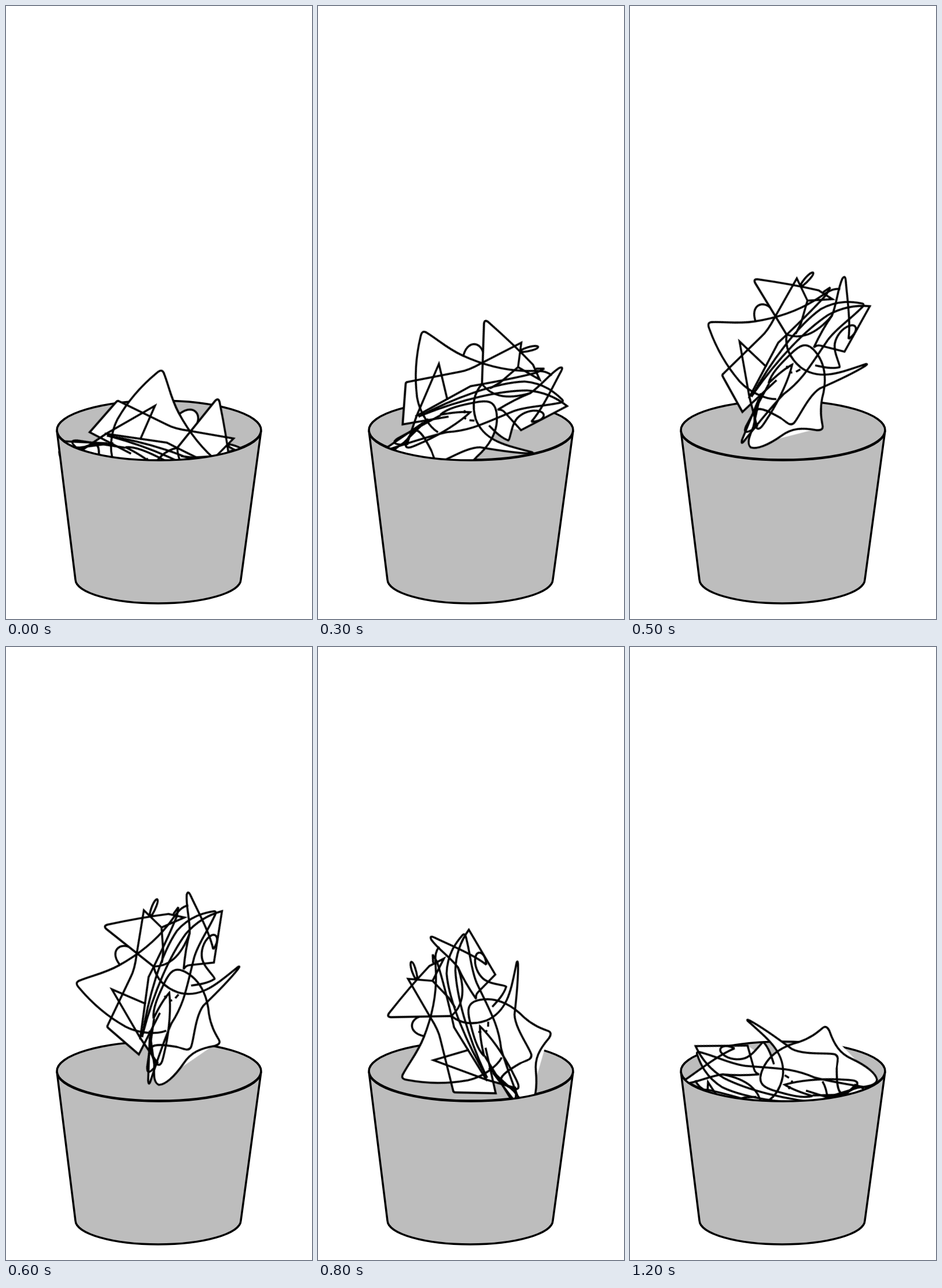
These frames come from a looping animation (529x1058 px, 1.3 s). An HTML page:

```html
<!DOCTYPE html>
<html lang="en">
<head>
<meta charset="utf-8">
<title>Paper basket</title>
<style>
  html, body { margin: 0; width: 100%; height: 100%; overflow: hidden; background: #fff; }
  svg { display: block; width: 100%; height: 100%; }
  .line { stroke: #000; stroke-width: 3.5; stroke-linejoin: miter; }
  .bin { fill: #bdbdbd; }
  #paper { fill: #fff; }
  #creases { fill: none; }
</style>
</head>
<body>
<svg viewBox="0 0 529 1058">
  <ellipse class="line bin" cx="264.5" cy="732" rx="176.5" ry="51"/>
  <g id="paper">
    <path d="M183 603L188 567L205 510L244 490L256 462L306 480L335 541L312 592L345 612L390 667L318 770L276 700L269 735L201 710L204 694Z"/>
    <g id="sheets"></g>
    <g id="creases" class="line"></g>
  </g>
  <path class="line bin" d="M88 733L120 990C121 1013 185 1031 263 1031S405 1013 406 990L441 733A176.5 51 0 0 1 88 733Z"/>
</svg>
<script>
const folds = [
  // left ear
  "M259 464C246 472 245 486 238 508C226 545 207 575 183 603C165 624 148 634 130 650C122 656 125 660 133 664C165 682 198 693 230 698C255 701 285 693 299 680",
  // upper ear running into the right horn
  "M229 516L260 486L232 490Q190 512 140 544Q133 549 141 552L240 584C250 600 268 611 295 611C335 608 352 575 377 533Q380 530 378 537C370 562 357 590 344 617C337 640 350 680 349 692C347 701 338 698 325 700C305 704 288 708 285 716C286 724 297 738 306 740C314 740 310 725 308 708C303 675 293 640 281 617Q274 635 271 668",
  // straight edges
  "M251 573L246 553L229 516L190 499L205 575Q211 600 209 615L201 706Q200 710 204 711L269 735L278 655",
  "M250 649L186 646L262 708L305 738",
  "M240 487L244 473L247 488Q246 530 238 604L262 710",
  // small loop and arc
  "M202 503C199 485 202 473 205 473C209 474 208 492 206 502Z",
  "M185 602C160 588 168 567 188 567",
  // top peaks
  "M326 520C310 495 275 465 257 447Q249 439 250 448C256 468 270 485 278 508C280 530 285 552 290 570Q291 563 297 560L335 541L317 453C300 465 282 485 272 512C260 555 255 620 263 700",
  "M264 705C250 640 244 560 256 512C268 480 290 466 304 458Q309 456 308 465C305 500 298 520 300 545C306 600 312 625 303 665Q301 700 304 772Q304 780 300 772L276 700",
  // lower right corner
  "M271 668C262 650 266 620 267 605C269 580 275 573 290 573C330 576 350 610 358 627C368 645 380 655 390 663Q396 668 387 675C365 688 352 700 347 722C340 750 330 768 320 772C310 772 306 760 300 742L272 690",
  "M272 668L290 750Q295 766 302 747L304 735",
  // curl
  "M326 520C331 500 322 492 315 498C306 508 306 525 311 537C318 555 345 562 346 567C338 578 325 585 312 592",
  "M240 584C262 575 278 555 278 508",
  "M275 625L280 627M290 627L287 630M294 622L297 614"
];

const addPaths = id => {
  const group = document.getElementById(id);
  for (const d of folds) {
    const path = document.createElementNS("http://www.w3.org/2000/svg", "path");
    path.setAttribute("d", d);
    group.append(path);
  }
};
addPaths("sheets");
addPaths("creases");

// time in ms, centre x, centre y, angle in degrees
const poses = [
  [0, 264.6, 772, 111],
  [200, 269, 718, 87.5],
  [300, 264, 679, 74],
  [400, 257, 640, 61],
  [500, 269, 600, 40.7],
  [600, 265, 583, 20.5],
  [700, 260, 610, 0],
  [800, 258, 655, -19],
  [900, 256, 705, -38],
  [1000, 254.7, 752.5, -57],
  [1100, 256, 766, -68],
  [1200, 256.6, 774.7, -79]
];
const loop = 1300;
const frames = poses.map(([time, x, y, angle]) => ({
  offset: time / loop,
  easing: "steps(1, end)",
  transform: `translate(${x}px, ${y}px) rotate(${angle}deg) translate(-260px, -610px)`
}));
frames.push({ ...frames[frames.length - 1], offset: 1 });
document.getElementById("paper").animate(frames, { duration: loop, iterations: Infinity });
</script>
</body>
</html>
```
